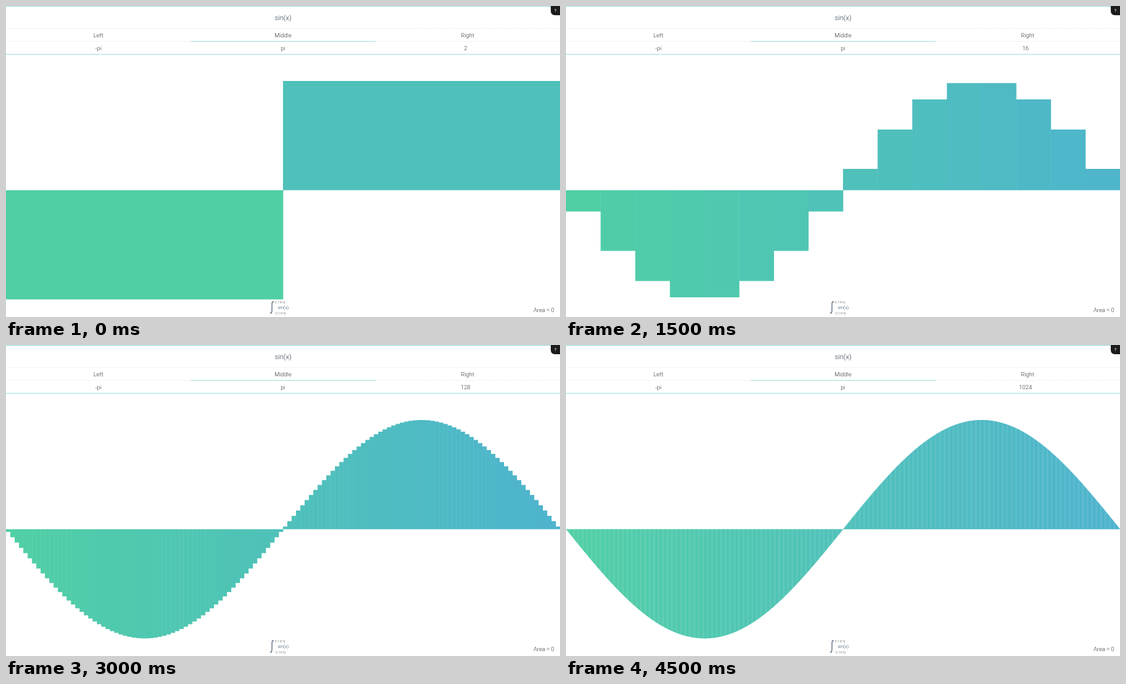
These frames come from a looping animation (900 px wide and 506 px high, 5 s). An HTML page with a canvas:

```html
<!DOCTYPE html>
<html lang="en">
<head>
<meta charset="utf-8">
<title>Riemann sum of sin(x)</title>
<style>
  html, body { margin: 0; width: 100%; height: 100%; overflow: hidden; background: #fff; }
  canvas, svg { position: absolute; left: 0; top: 0; width: 900px; height: 506px; }
  text { font: 300 9.375px Roboto, sans-serif; fill: #333; text-anchor: middle; }
  .title { font-size: 11.25px; fill: #2c3e50; }
  .body { font-size: 7.5px; fill: #34495e; }
  .limit { font-size: 5.625px; fill: #555; text-anchor: start; }
  .area { text-anchor: end; }
  .help { font-size: 7.5px; font-weight: 400; fill: #fff; }
  .rule { stroke: #e6eaea; stroke-dasharray: 1 1; }
  .teal { stroke: #8fe0de; }
</style>
</head>
<body>
<canvas id="plot" width="900" height="506"></canvas>
<svg viewBox="0 0 900 506">
  <path class="rule" d="M0 36.5H900M0 57.5H900"/>
  <path class="teal" d="M0 .5H900M0 78.7H900"/>
  <path d="M300 57.5H600" stroke="#9adfd6"/>
  <text class="title" x="450" y="22.5">sin(x)</text>
  <text x="150" y="51">Left</text>
  <text x="450" y="51">Middle</text>
  <text x="750" y="51">Right</text>
  <text x="150" y="72">-pi</text>
  <text x="450" y="72">pi</text>
  <text id="count" x="746.5" y="72">2</text>
  <path d="M885 0H900V15H892Q885 15 885 8Z" fill="#1c1c1c"/>
  <text class="help" x="892.5" y="10.3">?</text>
  <path d="M434.6 482C434.2 480.3 432.5 480.5 432.2 483.5C431.9 487 432.3 493 431.9 497C431.6 500 430 500.6 429.5 499" fill="none" stroke="#34495e" stroke-width="1.1"/>
  <text class="limit" x="436.6" y="483.5">3.1416</text>
  <text class="body" x="450.2" y="493">sin(x)</text>
  <text class="limit" x="436.2" y="501.9">-3.1416</text>
  <text class="area" x="890.7" y="498">Area = 0</text>
</svg>
<script>
const W = 900, H = 506, AXIS = 299.7, AMP = 177.7;
const STEP = 500, STEPS = 10;
const FROM = [80, 207, 165], TO = [78, 179, 206];
const count = document.getElementById('count');
const canvas = document.getElementById('plot');
const ctx = canvas.getContext('2d');
const ratio = window.devicePixelRatio || 1;
canvas.width = W * ratio;
canvas.height = H * ratio;
ctx.scale(ratio, ratio);

const mix = t => `rgb(${FROM.map((a, i) => Math.round(a + (TO[i] - a) * t))})`;

// Midpoint sum over [-pi, pi]; bars overlap slightly to hide seams.
function drawBars(n) {
  const w = W / n;
  ctx.clearRect(0, 0, W, H);
  for (let i = 0; i < n; i++) {
    const x = -Math.PI + (i + 0.5) * 2 * Math.PI / n;
    ctx.fillStyle = mix(i / n);
    ctx.fillRect(i * w, AXIS, w + 0.4, -AMP * Math.sin(x));
  }
}

let shown = 0;
function frame() {
  const n = 2 ** (1 + Math.floor(performance.now() / STEP) % STEPS);
  if (n !== shown) {
    shown = n;
    drawBars(n);
    count.textContent = n;
  }
  requestAnimationFrame(frame);
}
frame();
</script>
</body>
</html>
```
